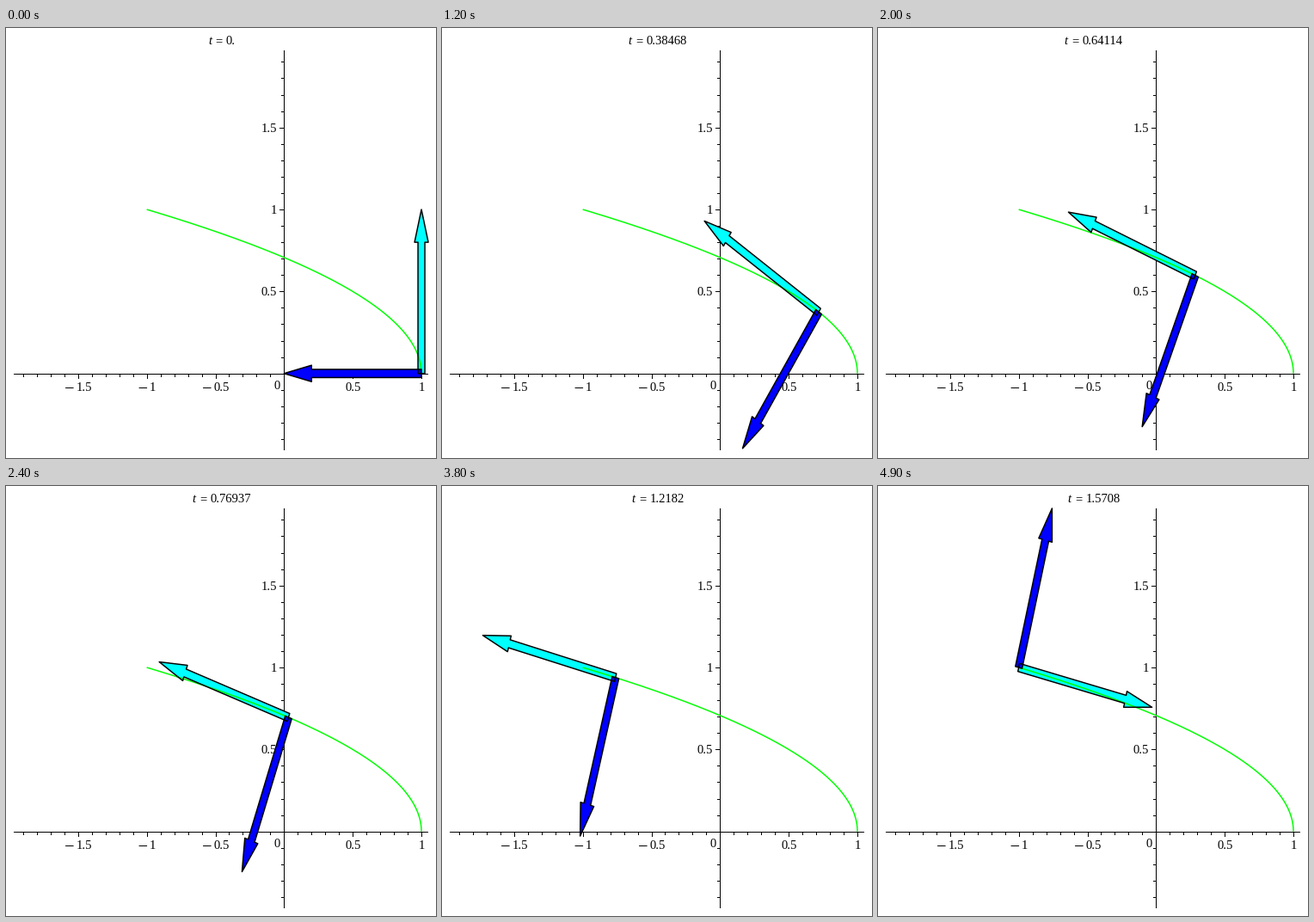
A matplotlib script for the animation above (5 s loop, 500 px wide and 500 px high).

```python
import numpy as np
import matplotlib.pyplot as plt
from matplotlib.animation import FuncAnimation

FRAMES, INTERVAL = 50, 100
PX = 0.72                       # points per pixel at 100 dpi
ORIGIN = np.array([323.35, 401.7])
SCALE = np.array([159.7, -190.7])
FONT_PX = 14.67
DIGIT = FONT_PX / 2

fig = plt.figure(figsize=(5, 5), dpi=100, facecolor="white")
ax = fig.add_axes([0, 0, 1, 1])
ax.set(xlim=(0, 500), ylim=(500, 0))
ax.axis("off")


def to_px(points):
    return ORIGIN + SCALE * np.asarray(points)


def text_width(s):
    return DIGIT * (len(s) - 0.5 * s.count("."))


def label(x, baseline, s, **kw):
    return ax.text(x, baseline, s, family="Liberation Serif",
                   size=FONT_PX * PX, va="baseline", **kw)


def line(x, y, color="black", width=1, **kw):
    # coordinates already sit on pixel centres, so no snapping
    return ax.plot(x, y, color=color, lw=width * PX, snap=False,
                   solid_capstyle="butt", **kw)[0]


def draw_axes():
    line([9, 491], [402.5, 402.5], zorder=1)
    line([323.5, 323.5], [26, 491], zorder=1)
    for k in range(-19, 20):
        size = 3 if k % 5 else 5
        x, y = np.round(to_px([k / 10, k / 10])) + 0.5
        if k <= 10:
            line([x, x], [402, 403 + size], zorder=1)
        if k >= -4:
            line([323 - size, 323], [y, y], zorder=1)
        if k % 5:
            continue
        number = f"{abs(k) / 10:g}"
        if k == 0:
            label(312, 420, number)
        elif k < 0:
            left = x - (12.5 + text_width(number)) / 2
            line([left, left + 9.5], [418.5, 418.5])
            label(left + 12.5, 422, number)
        elif k <= 10:
            label(x, 422, number, ha="center")
        if k > 0:
            label(315, y + 4.5, number, ha="right")


def arrow_outline(start, d):
    side = np.array([-d[1], d[0]])
    along = np.array([0, 0.8, 0.8, 1, 0.8, 0.8, 0])
    across = np.array([1, 1, 2, 0, -2, -1, -1]) * 0.025
    return to_px(start + np.outer(along, d) + np.outer(across, side))


def make_arrow(color, zorder):
    fill = ax.fill([0, 1, 1], [0, 0, 1], fc=color, ec="none", zorder=zorder)[0]
    edge = ax.fill([0, 1, 1], [0, 0, 1], fc="none", ec="black", lw=1.5 * PX,
                   joinstyle="round", zorder=zorder + 0.5)[0]
    return fill, edge


draw_axes()
s = np.linspace(0, np.pi / 2, 300)
curve = to_px(np.column_stack([np.cos(2 * s), np.sin(s)]))
line(curve[:, 0], curve[:, 1], "#00ff00", 1.5, zorder=5)
tangent_arrow = make_arrow("#00ffff", 4)
normal_arrow = make_arrow("#0000ff", 6)
tangent_arrow[1].set_zorder(6.2)
title_t = label(0, 19, "t", style="italic")
title_value = label(0, 19, "")
title_eq = label(0, 19, "=")


def update(i):
    t = i * np.pi / 2 / (FRAMES - 1)
    point = np.array([np.cos(2 * t), np.sin(t)])
    # direction of (-2 sin 2t, cos t) with the common factor cos t removed
    tangent = np.array([-4 * np.sin(t), 1])
    tangent /= np.hypot(*tangent)
    if i == FRAMES - 1:
        tangent = -tangent      # the curve turns back on itself at its end
    normal = np.array([-tangent[1], tangent[0]])
    for parts, d in ((tangent_arrow, tangent), (normal_arrow, normal)):
        for part in parts:
            part.set_xy(arrow_outline(point, d))

    value = f"{t:#.5g}" if i else "0."
    left = 251 - (21 + text_width(value)) / 2
    title_t.set_x(left)
    title_eq.set_x(left + 8.5)
    title_value.set_x(left + 21)
    title_value.set_text(value)
    return ()


anim = FuncAnimation(fig, update, frames=FRAMES, interval=INTERVAL,
                     repeat=True, repeat_delay=0)
plt.show()
```
